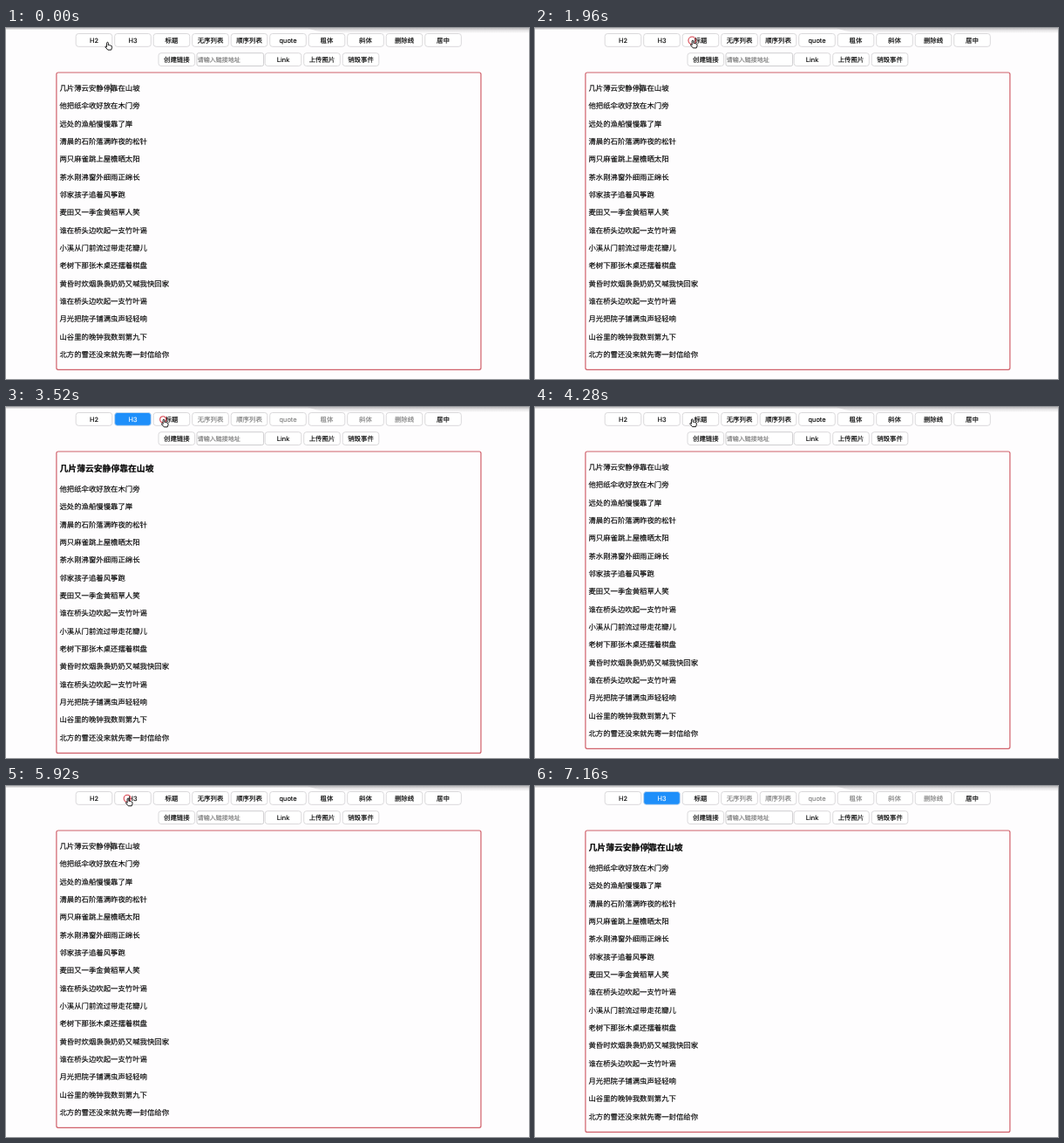
Write an HTML page that moves like this. It is 600x402 px and loops after 7200 ms.

```html
<!DOCTYPE html>
<html lang="zh-CN">
<head>
<meta charset="utf-8">
<title>Rich text editor</title>
<style>
  html, body { margin: 0; width: 100%; height: 100%; overflow: hidden; background: #fefdfe; }
  svg { display: block; width: 600px; height: 402px; }
  text {
    font-family: Inter, "Noto Sans CJK SC", "Noto Sans CJK", sans-serif;
    text-rendering: geometricPrecision;
    fill: currentColor; stroke: currentColor; stroke-width: 0.14px;
  }
</style>
</head>
<body>
<svg id="stage" viewBox="0 0 600 402">
  <defs>
    <linearGradient id="shade" x2="0" y2="1">
      <stop offset="0" stop-color="#bcbbbd"/>
      <stop offset="1" stop-color="#bcbbbd" stop-opacity="0"/>
    </linearGradient>
  </defs>
  <rect width="600" height="402" fill="#fefdfe"/>
  <rect width="600" height="2.5" fill="url(#shade)"/>
  <path d="M345 0Q362 6 380 6H600V0Z" fill="url(#shade)" opacity="0.7"/>
</svg>
<script>
const LOOP = 7200, STEP = 40, FADE = 320;
const LEFT = 61.5, PITCH = 20.32;
const stage = document.getElementById('stage');

const formats = {
  p:  { size: 8.4,  weight: 400, y: 69,   shift: 0,   bottom: 391.3 },
  h2: { size: 12.6, weight: 700, y: 73,   shift: 9.6, bottom: 401.2 },
  h3: { size: 9.82, weight: 700, y: 70.7, shift: 4.7, bottom: 396.4 }
};

// [time, format] pairs
const changes = [[0, 'p'], [2080, 'h2'], [2920, 'h3'], [3720, 'p'], [6120, 'h3']];
// [start, end] of each mouse press
const presses = [[1840, 2080], [2720, 2920], [3520, 3720], [5840, 6080]];
const caretOn = [[0, 440], [920, 1440], [1920, 2080], [4600, 5080], [5560, 6040], [6960, LOOP]];
// [time, x, y] of the fingertip
const path = [
  [0, 116.5, 16.5], [40, 116.5, 16.5], [200, 107, 15.5], [1040, 107, 15.5], [1520, 181, 14.3],
  [4240, 181, 14.3], [4280, 180.3, 14], [4520, 180.3, 14], [4800, 182, 13.2],
  [4960, 182, 13.2], [5560, 140, 14.2], [6600, 140, 14.2], [7040, 163, 62]
];

const lines = [
  '几片薄云安静停靠在山坡', '他把纸伞收好放在木门旁', '远处的渔船慢慢靠了岸',
  '清晨的石阶落满昨夜的松针', '两只麻雀跳上屋檐晒太阳', '茶水刚沸窗外细雨正绵长',
  '邻家孩子追着风筝跑', '麦田又一季金黄稻草人笑', '谁在桥头边吹起一支竹叶谣',
  '小溪从门前流过带走花瓣儿', '老树下那张木桌还摆着棋盘', '黄昏时炊烟袅袅奶奶又喊我快回家',
  '谁在桥头边吹起一支竹叶谣', '月光把院子铺满虫声轻轻响', '山谷里的晚钟我数到第九下',
  '北方的雪还没来就先寄一封信给你'
];

function set(node, attrs) {
  for (const key in attrs) node.setAttribute(key, attrs[key]);
  return node;
}

function add(tag, attrs, parent = stage) {
  const node = document.createElementNS('http://www.w3.org/2000/svg', tag);
  return parent.appendChild(set(node, attrs));
}

function label(str, x, y, size, attrs, parent) {
  const node = add('text', { x, y: y + size * 0.37, 'font-size': size, color: '#000', ...attrs }, parent);
  node.textContent = str;
  return node;
}

function button(name, cx, y) {
  const box = add('rect', {
    x: cx - 20.8, y, width: 41.6, height: 14.8, rx: 3,
    fill: '#fff', stroke: '#d6d5d7', 'stroke-width': 0.9
  });
  return { name, box, text: label(name, cx, y + 7.5, 7.4, { 'text-anchor': 'middle' }) };
}

const tools = ['H2', 'H3', '标题', '无序列表', '顺序列表', 'quote', '粗体', '斜体', '删除线', '居中']
  .map((name, i) => button(name, 101 + i * 44.5, 6.5));
[['创建链接', 195.8], ['Link', 318], ['上传图片', 362.5], ['销毁事件', 407]]
  .forEach(([name, cx]) => button(name, cx, 28.7));
add('rect', { x: 219, y: 28.7, width: 76.6, height: 14.8, rx: 2, fill: '#fff', stroke: '#c9c8ca', 'stroke-width': 0.9 });
label('请输入链接地址', 219.7, 36.2, 7, { color: '#757575' });

const frame = add('rect', { x: 57.9, y: 51, width: 487, rx: 2, fill: 'none', stroke: '#d0606a', 'stroke-width': 1.2 });
const title = label(lines[0], LEFT, 69, 8.4);
const body = add('g', {});
lines.slice(1).forEach((str, i) => label(str, LEFT, 69 + (i + 1) * PITCH, 8.4, {}, body));
const caret = add('rect', { width: 0.7, fill: '#000' });

const ring = add('circle', { fill: 'none', stroke: '#d8404c', 'stroke-width': 1.1 });
const hand = add('path', {
  d: 'M-.9 .8Q-.8 -.2 0 -.2T.9 .8V3.2Q1.8 2.7 2.4 3.4Q3.3 3 3.8 3.8Q4.9 3.6 5 4.7V6.2L4.2 8.6H.3L-2.5 5.4Q-2.7 4.3 -1.6 4.5L-.9 5.2Z',
  fill: '#fff', stroke: '#000', 'stroke-width': 0.9, 'stroke-linejoin': 'round'
});
const arrow = add('path', {
  d: 'M0 0V8L1.9 6.3L3.2 9.1L4.4 8.6L3.2 5.8H5.6Z',
  fill: '#111', stroke: '#fff', 'stroke-width': 0.6
});

const within = (spans, t) => spans.find(([a, b]) => t >= a && t < b);
const mix = (a, b, k) => `rgb(${a.map((v, i) => Math.round(v + (b[i] - v) * k))})`;
const show = (node, on) => set(node, { visibility: on ? 'visible' : 'hidden' });

// Colours of a toolbar button: fill, border, text
function look(index, format) {
  if (tools[index].name.toLowerCase() === format) return [[30, 143, 250], [190, 213, 236], [255, 255, 255]];
  const disabled = format !== 'p' && index > 2 && index < 9;
  const ink = disabled ? 128 : 0;
  return [[255, 255, 255], [214, 213, 215], [ink, ink, ink]];
}

function pointerAt(t) {
  const next = path.findIndex(p => p[0] > t);
  if (next < 0) return path[path.length - 1].slice(1);
  const [t0, x0, y0] = path[next - 1], [t1, x1, y1] = path[next];
  const u = (t - t0) / (t1 - t0), k = u * u * (3 - 2 * u);
  return [x0 + (x1 - x0) * k, y0 + (y1 - y0) * k];
}

function draw(t) {
  const now = changes.filter(c => c[0] <= t).length - 1;
  const [since, name] = changes[now];
  const before = now ? changes[now - 1][1] : name;
  const fade = Math.min(1, (t - since) / FADE);
  const f = formats[name];

  tools.forEach(({ box, text }, i) => {
    const from = look(i, before), to = look(i, name);
    const [fill, stroke, color] = from.map((c, j) => mix(c, to[j], fade));
    set(box, { fill, stroke });
    set(text, { color });
  });

  set(title, { y: f.y + f.size * 0.37, 'font-size': f.size, 'font-weight': f.weight });
  set(body, { transform: `translate(0 ${f.shift})` });
  set(frame, { height: f.bottom - 51 });
  const tall = f.size * 1.28;
  set(caret, { x: LEFT + 7 * f.size - 0.2, y: f.y - tall / 2, height: tall });
  show(caret, within(caretOn, t));

  const [x, y] = pointerAt(t);
  const press = within(presses, t);
  show(ring, press);
  if (press) set(ring, { cx: x - 0.8, cy: y, r: 3.5 + Math.min(1, (t - press[0]) / 160) });
  show(hand, y < 21);
  show(arrow, y >= 21 && y < 50);
  for (const node of [hand, arrow]) set(node, { transform: `translate(${x} ${y})` });
}

function tick() {
  const t = performance.now() % LOOP;
  draw(Math.floor(t / STEP) * STEP);
  requestAnimationFrame(tick);
}
tick();
</script>
</body>
</html>
```
